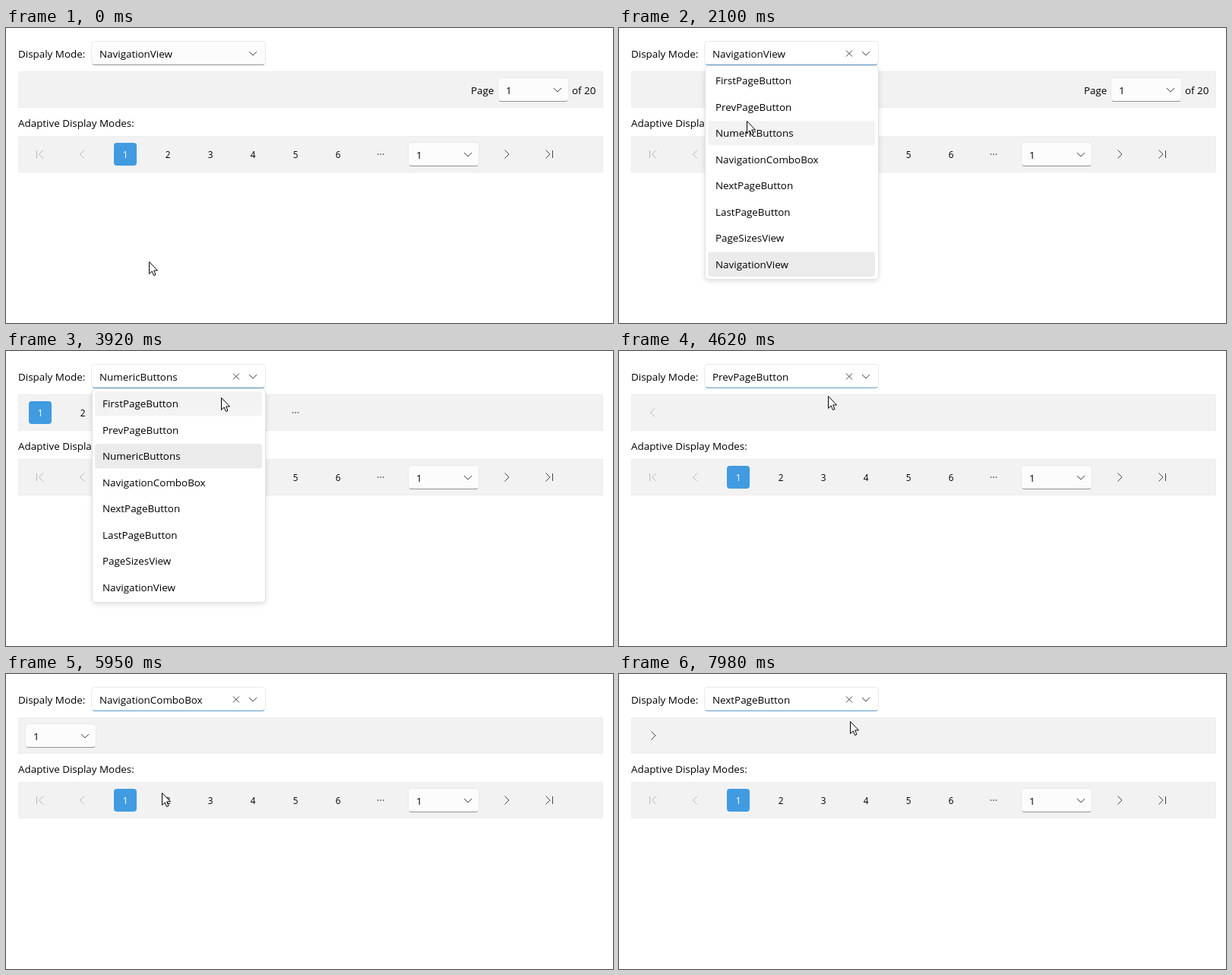
An HTML page that plays this animation: 799x388 px, repeating every 8 s.

```html
<!DOCTYPE html>
<html lang="en">
<head>
<meta charset="utf-8">
<style>
  html, body { margin: 0; width: 100%; height: 100%; overflow: hidden; background: #fff; }
  svg { display: block; font: 13.4px "Open Sans", "Noto Sans", sans-serif; fill: #000; }
  .small { font-size: 11.8px; text-anchor: middle; }
  .line { fill: none; stroke: #444; }
  .dim { stroke: #b5b5b5; }
</style>
</head>
<body>
<svg id="stage" width="799" height="388" viewBox="0 0 799 388"></svg>
<script>
const LOOP = 8000, STEP = 70, ITEM_TOP = 52, ITEM_HEIGHT = 34.5;
const modes = ['FirstPageButton', 'PrevPageButton', 'NumericButtons', 'NavigationComboBox',
  'NextPageButton', 'LastPageButton', 'PageSizesView', 'NavigationView'];

// Each round: chevron pressed, list opened, item picked.
const rounds = [
  { press: 1050, open: 1260, pick: 2310, mode: 2 },
  { press: 3360, open: 3570, pick: 4200, mode: 1 },
  { press: 5250, open: 5390, pick: 5950, mode: 3 },
  { press: 6790, open: 6930, pick: 7700, mode: 4 },
];

// Pointer stops: time, x, y.
const stops = [
  [140, 188, 307], [980, 320, 36], [1540, 320, 36], [2100, 168, 122], [2450, 168, 122],
  [3150, 309, 49], [3290, 322, 38], [3780, 322, 38], [4130, 212, 103], [4200, 212, 103],
  [4620, 275, 59], [5110, 324, 38], [5390, 324, 38], [5740, 205, 156], [5950, 205, 156],
  [6720, 327, 38], [6930, 327, 38], [7280, 201, 213], [7420, 201, 213], [7560, 201, 211],
  [7630, 201, 211], [7980, 304, 62],
];

function pointerAt(t) {
  const next = stops.findIndex(stop => stop[0] > t);
  if (next < 1) return (next ? stops[stops.length - 1] : stops[0]).slice(1);
  const [t0, x0, y0] = stops[next - 1], [t1, x1, y1] = stops[next];
  const p = (t - t0) / (t1 - t0), e = p * p * (3 - 2 * p);
  return [Math.round(x0 + (x1 - x0) * e), Math.round(y0 + (y1 - y0) * e)];
}

const text = (x, y, s, attrs = '') => `<text x="${x}" y="${y}" ${attrs}>${s}</text>`;
const line = (d, dim) => `<path class="line ${dim ? 'dim' : ''}" d="${d}"/>`;
const rect = (x, y, w, h, r, fill, extra = '') =>
  `<rect x="${x}" y="${y}" width="${w}" height="${h}" rx="${r}" fill="${fill}" ${extra}/>`;

const chevron = (x, y, dim) => line(`M${x - 5} ${y - 2.5}l5 5 5-5`, dim);
const prevArrow = (x, y) => line(`M${x + 2.5} ${y - 5.5}l-5.5 5.5 5.5 5.5`, true);
const nextArrow = (x, y) => line(`M${x - 2.5} ${y - 5.5}l5.5 5.5-5.5 5.5`);
const firstArrow = (x, y) => prevArrow(x + 1.5, y) + line(`M${x - 4.5} ${y - 5}v10`, true);
const lastArrow = (x, y) => nextArrow(x - 2, y) + line(`M${x + 4.5} ${y - 5}v10`);

function field(x, y, w, h, focused) {
  return rect(x + .5, y + .5, w - 1, h - 1, 4, focused ? '#fff' : '#fcfcfc', 'stroke="#e9e9e9"') +
    line(`M${x + 2} ${y + h - 1.5}q1 1 3 1h${w - 10}q2 0 3-1" style="stroke:${focused ? '#5b9bc9' : '#929292'}`);
}

const pageBox = (x, y) => field(x, y, 94, 32) + text(x + 11, y + 21.5, '1') + chevron(x + 79, y + 16.5);
const panel = y => rect(16.5, y + .5, 769, 47, 0, '#f2f2f2', 'stroke="#eee"');

function numbers(x, y) {
  let out = rect(x - 15, y - 15, 30, 30, 4, '#419be1');
  for (let i = 0; i < 6; i++)
    out += text(x + 56 * i, y + 5, i + 1, `class="small" ${i ? '' : 'fill="#fff"'}`);
  for (let i = -1; i < 2; i++)
    out += rect(x + 335.3 + i * 3.5, y - .8, 1.5, 1.5, .5, '#333');
  return out;
}

const pagers = {
  PrevPageButton: () => prevArrow(44.5, 81),
  NumericButtons: () => numbers(45, 81),
  NavigationComboBox: () => pageBox(25, 65),
  NextPageButton: () => nextArrow(45, 81),
  NavigationView: () => text(612, 87, 'Page') + pageBox(647, 65) + text(745, 87, 'of 20'),
};

const adaptivePager = panel(142) + firstArrow(45, 166) + prevArrow(100.5, 166) + numbers(157, 166) +
  pageBox(529, 150) + nextArrow(659, 166) + lastArrow(715, 166);

function dropDown(selected, y) {
  const hovered = Math.floor((y - ITEM_TOP) / ITEM_HEIGHT);
  return rect(113.5, 49.5, 228, 281, 5, '#fff',
    'stroke="#e2e2e2" style="filter:drop-shadow(0 2px 3px #0002)"') +
    modes.map((name, i) => {
      const top = ITEM_TOP + i * ITEM_HEIGHT;
      const fill = i === selected ? '#ebebeb' : i === hovered ? '#f3f3f3' : 'none';
      return rect(117, top + 1, 220, ITEM_HEIGHT - 2, 4, fill) + text(127, top + 22, name);
    }).join('');
}

function scene(t) {
  const [x, y] = pointerAt(t);
  const picked = rounds.filter(r => t >= r.pick).pop();
  const mode = picked ? picked.mode : 7;
  const pressed = rounds.some(r => t >= r.press && t < r.open);
  const open = rounds.some(r => t >= r.open && t < r.pick);
  const focused = t >= rounds[0].open;
  return text(16, 39, 'Dispaly Mode:') + field(112, 17, 230, 32, focused) +
    text(123, 39, modes[mode]) + chevron(325, 33.5, pressed) +
    (focused ? line('M299 29.5l8 8m0-8l-8 8') : '') +
    panel(57) + pagers[modes[mode]]() +
    text(16, 130, 'Adaptive Display Modes:') + adaptivePager +
    (open ? dropDown(mode, y) : '') +
    `<path transform="translate(${x} ${y})" fill="#fff" stroke="#000"
      d="M.5.5V16.5L4.2 13 6.5 18.5 9 17.5 6.7 12H11.5Z"/>`;
}

const stage = document.getElementById('stage');
let shown = -1;
function frame() {
  const t = Math.floor(performance.now() % LOOP / STEP) * STEP;
  if (t !== shown) stage.innerHTML = scene(shown = t);
  requestAnimationFrame(frame);
}
frame();
</script>
</body>
</html>
```
